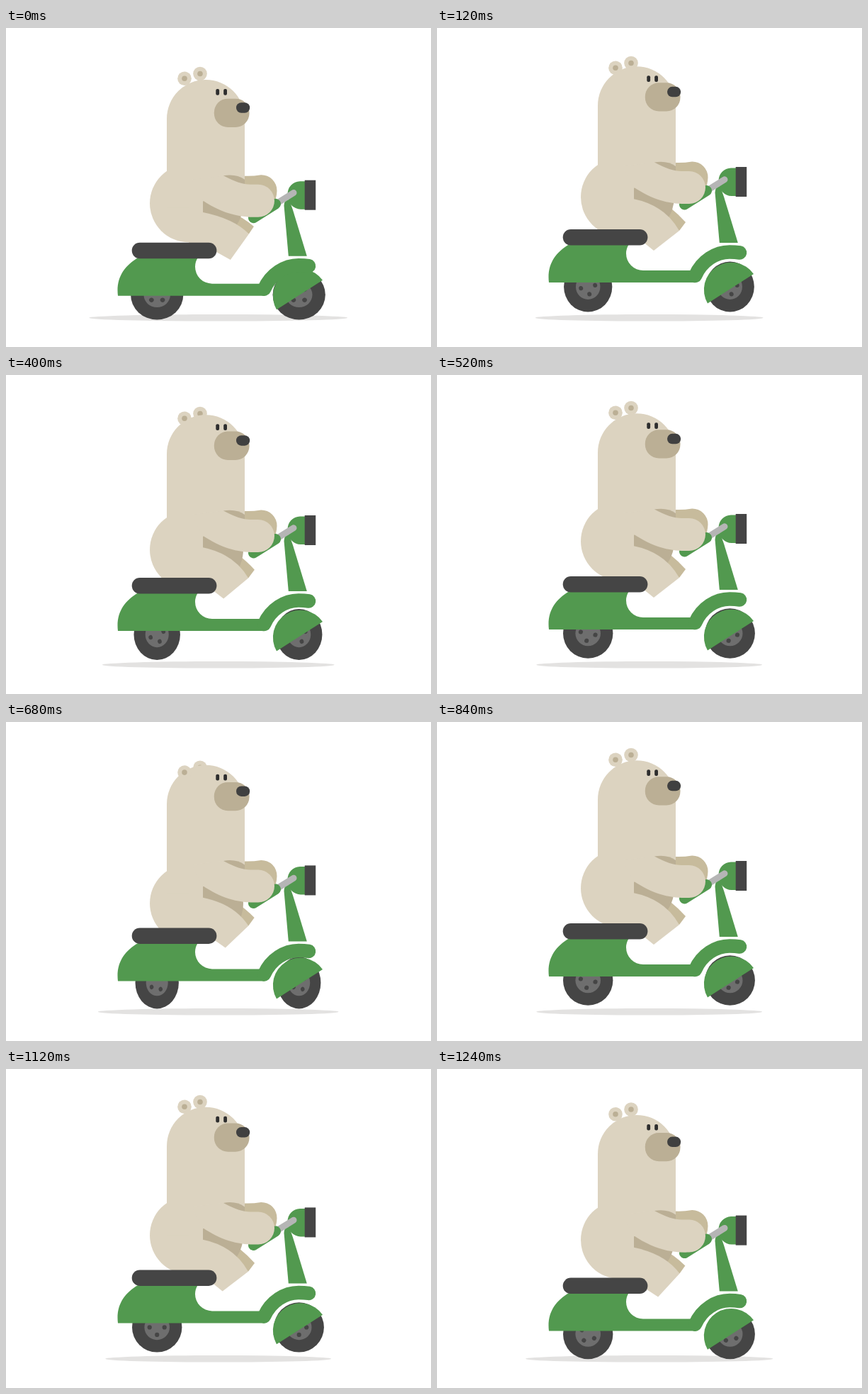
Write an HTML page that moves like this. It is 600 px wide and 450 px high and loops after 1280 ms.

```html
<!DOCTYPE html>
<html lang="en">
<head>
<meta charset="utf-8">
<title>Bear on a scooter</title>
<style>
html, body { margin: 0; height: 100%; overflow: hidden; background: #fff; }
svg { display: block; width: 600px; height: 450px; }
.fur { fill: #dcd3c0; }
.shade { fill: #bbaf95; }
.far { fill: #c7bb9c; }
.green { fill: #52994f; }
.dark { fill: #454545; }
.line { fill: none; stroke: #52994f; stroke-linecap: round; }
</style>
</head>
<body>
<svg viewBox="0 0 600 450">
  <defs>
    <g id="wheel">
      <circle class="dark" r="35.2"/>
      <circle r="17.8" fill="#6e6e6e"/>
      <g class="dark spin">
        <circle cx="10.5" r="3.1"/><circle cx="-10.5" r="3.1"/>
        <circle cy="10.5" r="3.1"/><circle cy="-10.5" r="3.1"/>
      </g>
    </g>
  </defs>
  <ellipse id="shadow" cx="299.7" cy="408.8" ry="4.8" fill="#e3e2e1"/>
  <use id="rear" href="#wheel"/>
  <use id="front" href="#wheel"/>
  <path id="fender" class="green" d="M382 388.5A38.6 38.6 0 0 1 447 347Z"/>

  <path id="farLeg" class="far"/>
  <path class="shade hip" d="M277.5 179.5H280A55 55 0 0 1 280 289.5H277.5Z"/>
  <path class="fur hip" d="M277.5 179.5H258A55 55 0 0 0 258 289.5H277.5Z"/>
  <path id="thigh" class="fur"/>

  <g class="ear"><circle class="fur" cx="274" cy="46.5" r="9.8"/><circle class="shade" cx="274" cy="46.5" r="3.8"/></g>
  <g class="ride">
    <path class="far" d="M330 189.5Q345 191 360 188.5A22 22 0 0 1 382.5 211Q382 222 378 228L350 225 330 215Z"/>
    <path class="fur" d="M227 109.3A55 55 0 0 1 337 109.3V203L277.5 226V286H258V235H227Z"/>
    <path class="shade" d="M307 189.5Q325 186.500 337 195V204L307 192Z"/>

    <path class="green" d="M158 359C155 335 166 317 187 305H271Q267 311 267 318A24 24 0 0 0 291 342H365V359Z"/>
    <path class="line" stroke-width="19.5" d="M364.500 349.500C374 328 394 316 413 316Q421 316 427.500 317"/>
    <path class="green" d="M392.500 232Q393 222 400 224L405 238 424.800 303H398.800Z"/>
    <path class="green" d="M422 197.500H415A18 18 0 0 0 397.500 216V218A19 19 0 0 0 416 237H422Z"/>
    <rect class="dark" x="421.700" y="196" width="15.500" height="42"/>
    <path class="line" style="stroke:#b5b5b5" stroke-width="9" d="M380 230L406 213.800"/>
    <path class="line" stroke-width="15" d="M349.500 249L380.500 229.500"/>
    <path class="fur" d="M262 195L307 189.500Q330 202 345 202H356A23 23 0 0 1 356 248C330 249 305 243 277 224Z"/>
    <rect class="dark" x="177.700" y="284" width="119.700" height="22.500" rx="11.200"/>
    <g fill="#2e2e2e">
      <rect x="296.300" y="67.300" width="4.800" height="8.700" rx="2"/>
      <rect x="307.200" y="67.300" width="4.800" height="8.700" rx="2"/>
    </g>
  </g>
  <g class="ear"><circle class="fur" cx="252" cy="53.300" r="9.800"/><circle class="shade" cx="252" cy="53.300" r="3.800"/></g>
  <g id="muzzle">
    <rect class="shade" x="293.800" y="77.200" width="49.700" height="40.300" rx="19.500"/>
    <rect x="325" y="82.800" width="19.200" height="14.500" rx="7.200" fill="#404040"/>
  </g>
</svg>
<script>
// One hop lasts 320 ms, drawn at 25 poses per second; four hops turn the wheels once.
const STEP = 40, LOOP = 1280;
const hop = {
  ride:   [18.7, 6.4, 2, 0, -.6, 0, 4.4, 10.6],
  hip:    [12.8, 21.3, 12, 4, 0, 0, 2.5, 6.5],
  ear:    [18, 17.8, 8, 3, 0, 0, 4, 10.5],
  fender: [8.8, 2, 1, 0, -.3, 0, 3, 7.3],
  axle:   [376.3, 367.8, 366, 365, 364.4, 364.5, 368, 374],
  wide:   [1.055, .872, .93, .97, 1, 1, 1, 1],
  tall:   [1, 1.04, 1.02, 1.01, 1, 1, 1, 1],
  shadow: [182.5, 170, 164, 161, 159.5, 159.5, 166, 174.7]
};
const set = (selector, name, value) =>
  document.querySelectorAll(selector).forEach(el => el.setAttribute(name, value));
const shift = (selector, y) => set(selector, 'transform', `translate(0 ${y})`);

function draw(time) {
  const step = Math.floor((time % LOOP + .01) / STEP);
  const pose = {};
  for (const key in hop) pose[key] = hop[key][step % 8];
  const d = pose.ride;

  shift('.ride', d);
  shift('.hip', pose.hip);
  shift('.ear', pose.ear);
  shift('#fender', pose.fender);
  shift('#muzzle', d * 1.2);
  set('#shadow', 'rx', pose.shadow);
  set('.spin', 'transform', `rotate(${45 + step * 360 * STEP / LOOP})`);
  const squash = `scale(${pose.wide} ${pose.tall})`;
  set('#rear', 'transform', `translate(213.2 ${pose.axle}) ${squash}`);
  set('#front', 'transform', `translate(413.7 ${pose.axle}) ${squash}`);

  const knee = `${342 + d * .05} ${286 + d * .24}`;
  set('#thigh', 'd', `M277 ${241 + d}Q322 ${250 + d} ${knee}` +
    `L${306 + d * .58} ${314 + d * .7} 270 ${285 + d * .85}Z`);
  set('#farLeg', 'd', `M315 ${244 + d * .8}Q334 ${255 + d * .6} ${351 - d * .06} ${274 + d * .32}` +
    `L${knee} 315 ${265 + d * .6}Z`);
}

const start = performance.now();
function tick() {
  draw(performance.now() - start);
  requestAnimationFrame(tick);
}
tick();
</script>
</body>
</html>
```
